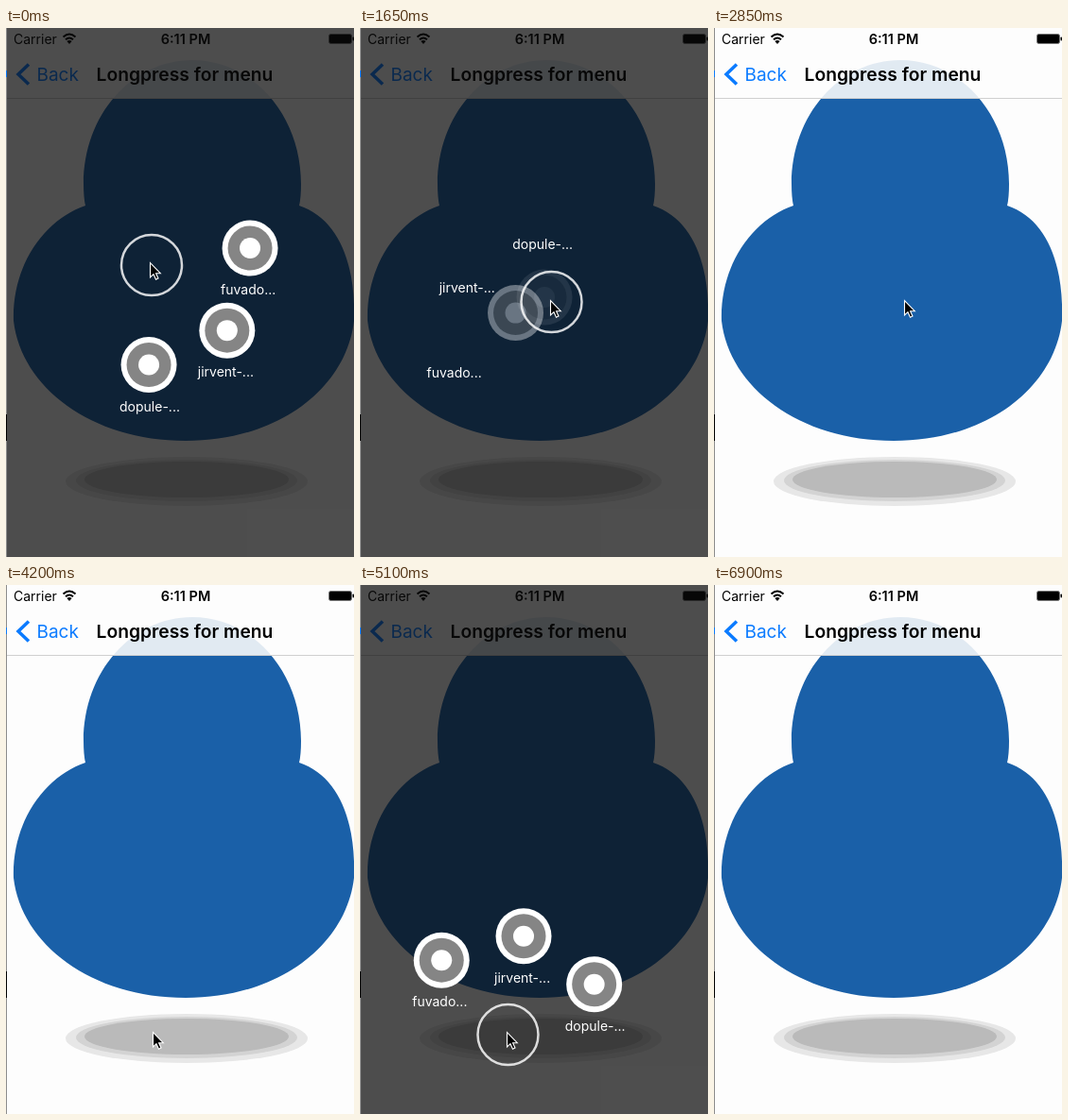
These frames come from a looping animation (368x560 px, 7 s). An HTML page:

```html
<!DOCTYPE html>
<html lang="en">
<head>
<meta charset="utf-8">
<title>Longpress for menu</title>
<style>
  html, body { margin: 0; width: 100%; height: 100%; overflow: hidden; background: #fdfdfd; }
  svg { display: block; width: 368px; height: 560px; font-family: Inter, Roboto, sans-serif; }
  .bold { font-weight: 600; }
</style>
</head>
<body>
<svg viewBox="0 0 368 560">
  <rect width="368" height="560" fill="#fdfdfd"/>

  <ellipse cx="191" cy="480" rx="128" ry="26" fill="#e7e7e7"/>
  <ellipse cx="191" cy="479" rx="117" ry="22" fill="#d3d3d3"/>
  <ellipse cx="191" cy="478" rx="108" ry="19" fill="#bababa"/>
  <path fill="#1a60a8" d="M197 34C261 34 312 92 312 165Q312 180 310 188C352 202 370 250 368 310
    C360 380 290 437 190 437C90 437 16 380 8 310C6 250 42 202 84 188Q82 180 82 165C82 92 133 34 197 34Z"/>

  <rect width="368" height="74" fill="#fdfdfd" fill-opacity=".88"/>
  <rect y="74" width="368" height="1" fill="#cfcfcf"/>

  <text x="8" y="16.5" font-size="14">Carrier</text>
  <path d="M60.5 9.5Q67 3.5 73.5 9.5M63 12.3Q67 8.6 71 12.3" fill="none" stroke="#000" stroke-width="2"/>
  <path d="M67 17l-2.6-3q2.6-2 5.2 0z"/>
  <text x="190" y="16.5" font-size="14.5" class="bold" text-anchor="middle">6:11 PM</text>
  <rect x="341.5" y="6.5" width="24" height="10" rx="2" stroke="#777"/>
  <rect x="366.5" y="9.5" width="1.5" height="4" rx=".7"/>

  <path d="M24 38.5L13 49L24 59.5" fill="none" stroke="#0b7bff" stroke-width="3.5"/>
  <text x="32.5" y="55.5" font-size="19" fill="#0b7bff">Back</text>
  <text x="189" y="55.5" font-size="19.3" class="bold" text-anchor="middle">Longpress for menu</text>

  <g id="overlay">
    <rect width="368" height="560" fill="#0a0a0a" fill-opacity=".72"/>
    <g id="items"></g>
    <circle id="ring" r="32" fill="none" stroke="#fff" stroke-opacity=".82" stroke-width="2.5"/>
  </g>

  <path d="M.5 0V409M.5 437V560" stroke="#8c8c8c"/>
  <path d="M.5 409V437" stroke="#000"/>
  <path d="M.5 45V52" stroke="#0b7bff"/>
  <path id="cursor" d="M.5 .5V16L4 12.7L6.5 18.2L9 17L6.6 11.7H11.3Z"
    fill="#000" stroke="#fff" stroke-width="1.1"/>
</svg>

<script>
const LOOP = 7000, STEP = 150, RADIUS = 105.6, SPREAD = 50.7;
const labels = ["fuvado...", "jirvent-...", "dopule-..."];

// Each menu fans out from its touch point, starting at the given angle.
const menus = [
  { from: 0, to: 750, start: -600, x: 154, y: 251, angle: -9.8 },
  { from: 1650, to: 2850, start: 1587, x: 202.5, y: 290, angle: 163 },
  { from: 4650, to: 5550, start: 4650, x: 156.5, y: 476, angle: 228.3 },
];

const cursorPath = [
  [0, 152, 248], [150, 152, 248], [300, 151, 253], [750, 151, 253],
  [1200, 201, 288], [3150, 201, 288], [3450, 204, 312], [4200, 155, 473],
  [5700, 155, 473], [6450, 325, 546], [6600, 340, 572], [LOOP, 340, 572],
];

const byId = id => document.getElementById(id);
const moveTo = (el, x, y) => el.setAttribute("transform", `translate(${x} ${y})`);

byId("items").innerHTML = labels.map(label => `
  <g><circle r="29.5" fill="#fff"/><circle r="23.5" fill="#858585"/><circle r="11" fill="#fff"/></g>
  <text font-size="14" fill="#fff">${label}</text>`).join("");
const icons = byId("items").querySelectorAll("g");
const texts = byId("items").querySelectorAll("text");

function cursorAt(t) {
  const i = cursorPath.findIndex(key => key[0] > t);
  const [t0, x0, y0] = cursorPath[i - 1], [t1, x1, y1] = cursorPath[i];
  const p = (t - t0) / (t1 - t0);
  return [x0 + (x1 - x0) * p, y0 + (y1 - y0) * p];
}

function drawMenu(menu, t) {
  moveTo(byId("ring"), menu.x, menu.y);
  labels.forEach((_, i) => {
    const q = Math.min(1, Math.max(0, (t - menu.start - i * 50) / 300));
    const p = 1 - (1 - q) ** 2;
    const a = (menu.angle + i * SPREAD) * Math.PI / 180;
    const dx = RADIUS * Math.cos(a), dy = RADIUS * Math.sin(a);
    moveTo(icons[i], menu.x + dx * p, menu.y + dy * p);
    icons[i].setAttribute("opacity", p);
    moveTo(texts[i], menu.x + dx - 31, menu.y + dy + 49);
  });
}

function frame(now) {
  const t = Math.floor(now % LOOP / STEP) * STEP;
  const menu = menus.find(m => t >= m.from && t < m.to);
  byId("overlay").style.display = menu ? "" : "none";
  if (menu) drawMenu(menu, t);
  moveTo(byId("cursor"), ...cursorAt(t));
  requestAnimationFrame(frame);
}
frame(performance.now());
</script>
</body>
</html>
```
